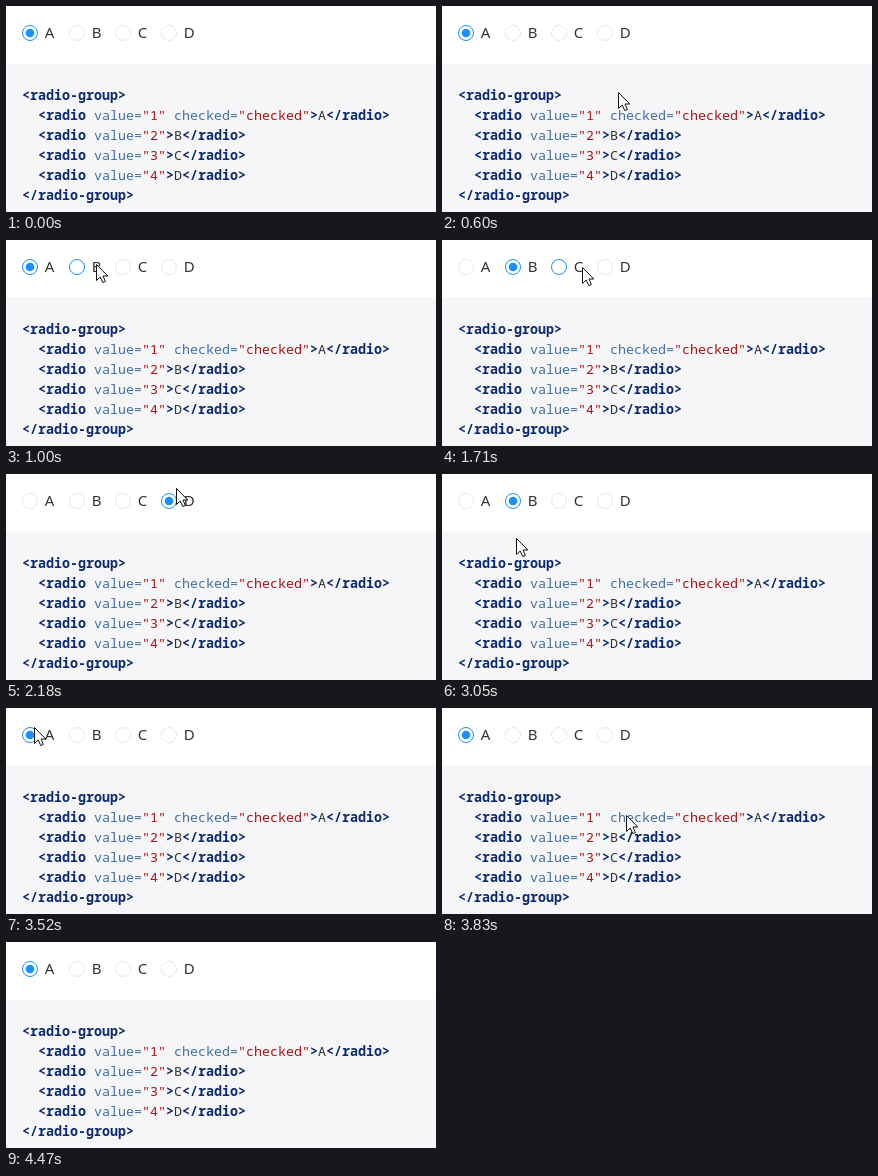
Recreate the animation shown at these times as an HTML page. Size 430 px wide and 206 px high, loop 5550 ms.

```html
<!DOCTYPE html>
<html lang="en">
<head>
<meta charset="utf-8">
<title>Radio group</title>
<style>
  html, body { margin: 0; width: 100%; height: 100%; overflow: hidden; background: #fff; }
  svg { display: block; width: 430px; height: 206px; }
  .label { font: 15px "Noto Sans", sans-serif; fill: #333; }
  .ring { fill: #fff; stroke: #e8e8e8; }
  .dot { fill: #1890ff; visibility: hidden; }
  .hover .ring, .checked .ring { stroke: #1890ff; }
  .checked .dot { visibility: visible; }
  .code { font: 13.333px "Noto Sans Mono", monospace; fill: #333; white-space: pre; }
  .tag { font-weight: 600; fill: #0b2a6f; }
  .attr { fill: #4070a0; }
  .value { fill: #a31515; }
</style>
</head>
<body>
<svg viewBox="0 0 430 206">
  <rect y="57.5" width="430" height="149" fill="#f6f6f8"/>
  <g id="radios"></g>
  <g id="code"></g>
  <path id="cursor" d="M.5 .5V16.5L4.2 13L6.8 18.6L9.4 17.5L7 12H11.8Z" fill="#fff" stroke="#111"/>
</svg>
<script>
const LOOP = 5550;
const SVG = "http://www.w3.org/2000/svg";
const cursor = document.getElementById("cursor");

function add(parent, name, attrs, text = "") {
  const node = parent.appendChild(document.createElementNS(SVG, name));
  for (const key in attrs) node.setAttribute(key, attrs[key]);
  node.textContent = text;
  return node;
}

const letters = ["A", "B", "C", "D"];
const radioLeft = i => Math.round(16.6 + 46.2 * i);

const radios = letters.map((letter, i) => {
  const x = i ? radioLeft(i) : 16;
  const group = add(document.getElementById("radios"), "g", {});
  add(group, "circle", { class: "ring", cx: x + 8, cy: 27, r: 7.5 });
  add(group, "circle", { class: "dot", cx: x + 8, cy: 27, r: 4.3 });
  add(group, "text", { class: "label", x: x + 22.7, y: 32 }, letter);
  return { group, x };
});

const lines = [
  "<radio-group>",
  ...letters.map((letter, i) =>
    `  <radio value="${i + 1}"${i ? "" : ' checked="checked"'}>${letter}</radio>`),
  "</radio-group>"
];

function kind(token) {
  if (/^[<>]/.test(token)) return "tag";
  if (token[0] === '"') return "value";
  return /^[a-z]/.test(token) ? "attr" : "plain";
}

lines.forEach((line, i) => {
  const row = add(document.getElementById("code"), "text", { class: "code", x: 16, y: 94 + 20 * i });
  for (const token of line.match(/<\/?[a-z-]+>?|>|"[^"]*"|[a-z]+=| +|[A-D]/g))
    add(row, "tspan", { class: kind(token) }, token);
});

// The screen refreshes in ticks; the pointer is seen from tick 0 until tick GONE.
const START = 360, TICK = 78.85, GONE = 52;

// Where the pointer passes or rests, and which radio it picks there.
const stops = [
  { at: 0, x: 300, y: 183 },
  { at: 3, x: 176, y: 86 },
  { at: 7, x: 97, y: 28 },
  { at: 10, x: 77, y: 15 },
  { at: 12, x: 89, y: 20, pick: 1 },
  { at: 14, x: 89, y: 20 },
  { at: 17, x: 140, y: 27 },
  { at: 21, x: 170, y: 14 },
  { at: 23, x: 170, y: 14, pick: 3 },
  { at: 28, x: 91, y: 42 },
  { at: 31, x: 76, y: 17, pick: 1 },
  { at: 34, x: 74, y: 64 },
  { at: 36, x: 67, y: 73 },
  { at: 40, x: 28, y: 19, pick: 0 },
  { at: 44, x: 184, y: 107 },
  { at: 48, x: 412, y: 191 }
];

function tipAt(tick) {
  const next = stops.findIndex(stop => stop.at > tick);
  if (next < 0) return stops[stops.length - 1];
  const a = stops[next - 1], b = stops[next];
  const k = (tick - a.at) / (b.at - a.at);
  return { x: Math.round(a.x + (b.x - a.x) * k), y: Math.round(a.y + (b.y - a.y) * k) };
}

function draw(now) {
  const tick = Math.floor((now % LOOP - START) / TICK);
  const tip = tick >= 0 && tick < GONE ? tipAt(tick) : { x: -20, y: -20 };
  const picked = stops.filter(stop => stop.at <= tick && "pick" in stop).pop();
  const chosen = picked ? picked.pick : 0;
  cursor.setAttribute("transform", `translate(${tip.x} ${tip.y})`);
  radios.forEach(({ group, x }, i) => {
    const hover = tip.x >= x && tip.x < x + 41 && tip.y >= 14 && tip.y < 39;
    group.classList.toggle("hover", hover);
    group.classList.toggle("checked", i === chosen);
  });
}

const start = performance.now();
function frame() {
  draw(performance.now() - start);
  requestAnimationFrame(frame);
}
draw(0);
requestAnimationFrame(frame);
</script>
</body>
</html>
```
